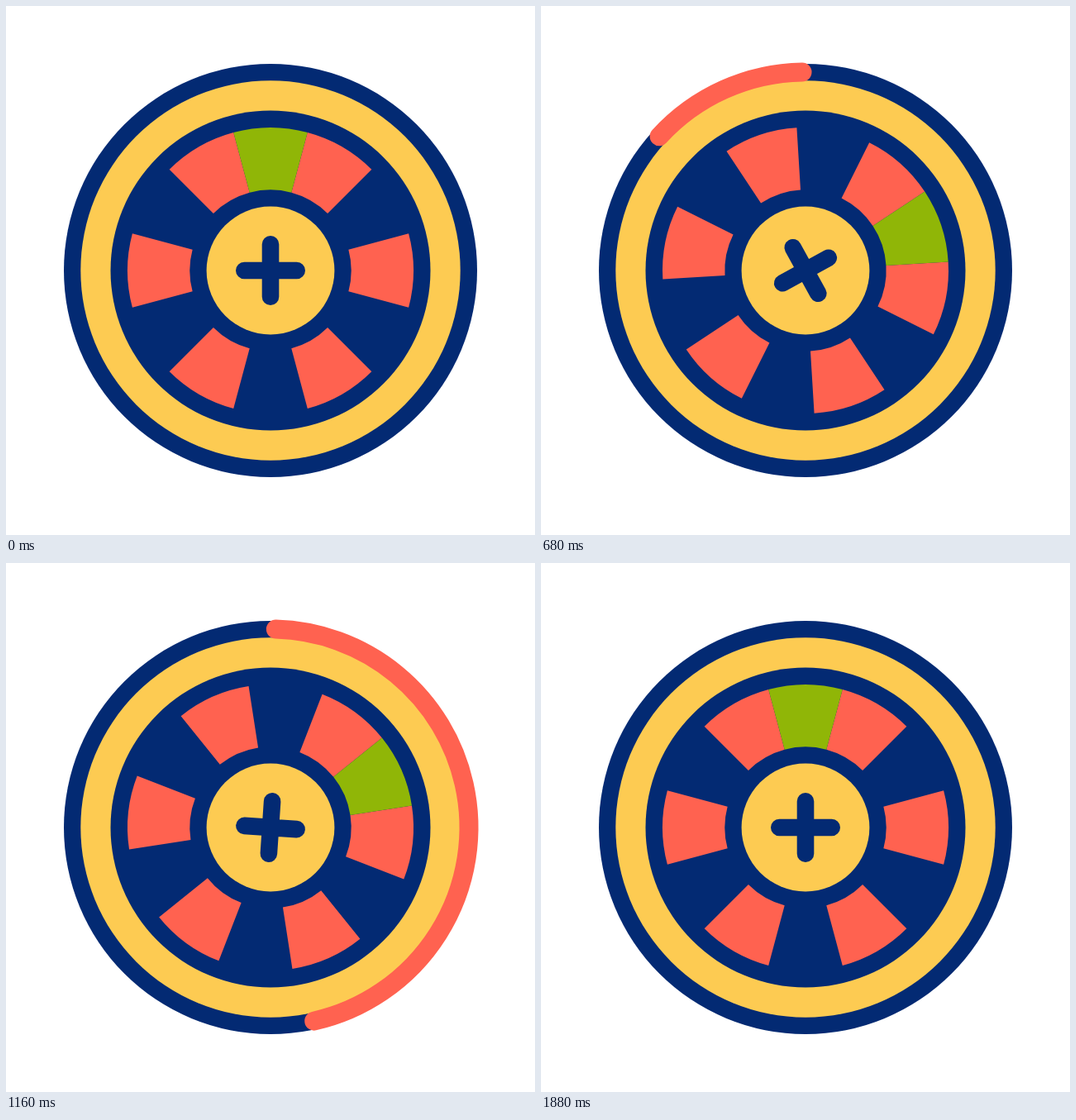
An HTML page with a canvas that plays this animation: 640x640 px, repeating every 2000 ms.

```html
<!DOCTYPE html>
<html>
<head>
<meta charset="utf-8">
<style>
html, body { margin: 0; width: 100%; height: 100%; overflow: hidden; background: #fff; }
canvas { display: block; }
</style>
</head>
<body>
<canvas id="stage" width="640" height="640"></canvas>
<script>
const ctx = document.getElementById('stage').getContext('2d');
const NAVY = '#032a73', YELLOW = '#fdcb52', RED = '#ff6250', GREEN = '#90b607';
const LOOP = 2000, STEP = 40;
const rad = deg => deg * Math.PI / 180;

// Progress from 0 to 1 between two times, eased by cubic-bezier(x1, 0, x2, 1)
function ease(t, from, to, x1, x2) {
  const x = Math.min(1, Math.max(0, (t - from) / (to - from)));
  let lo = 0, hi = 1;
  for (let i = 0; i < 24; i++) {
    const s = (lo + hi) / 2, r = 1 - s;
    if (3 * r * r * s * x1 + 3 * r * s * s * x2 + s * s * s < x) lo = s;
    else hi = s;
  }
  return x === 0 || x === 1 ? x : lo * lo * (3 - 2 * lo);
}

function disc(radius, color) {
  ctx.beginPath();
  ctx.arc(0, 0, radius, 0, 2 * Math.PI);
  ctx.fillStyle = color;
  ctx.fill();
}

// Ring segment 30 degrees wide, angle measured clockwise from the top
function segment(angle, color) {
  const a = rad(angle - 105), b = rad(angle - 75);
  ctx.beginPath();
  ctx.arc(0, 0, 173, a, b);
  ctx.arc(0, 0, 97.7, b, a, true);
  ctx.fillStyle = color;
  ctx.fill();
}

function wheel(angle) {
  for (let k = 0; k < 6; k++) segment(angle - 30 + 60 * k, RED);
  segment(angle, GREEN);
}

function plus(angle) {
  ctx.save();
  ctx.rotate(rad(angle));
  ctx.beginPath();
  ctx.moveTo(-31.7, 0);
  ctx.lineTo(31.7, 0);
  ctx.moveTo(0, -31.7);
  ctx.lineTo(0, 31.7);
  ctx.lineWidth = 20.6;
  ctx.strokeStyle = NAVY;
  ctx.stroke();
  ctx.restore();
}

// Trail running counterclockwise around the rim
function trail(t) {
  const head = 360 * ease(t, 330, 1200, 0.771, 0.664);
  const tail = 360 * ease(t, 680, 1600, 1 / 3, 2 / 3);
  if (head - tail < 0.05) return;
  ctx.beginPath();
  ctx.arc(0, 0, 240, rad(-90.95 - tail), rad(-90.95 - head), true);
  ctx.lineWidth = 23;
  ctx.strokeStyle = RED;
  ctx.stroke();
}

function draw(t) {
  ctx.setTransform(1, 0, 0, 1, 0, 0);
  ctx.fillStyle = '#fff';
  ctx.fillRect(0, 0, 640, 640);
  ctx.translate(320, 320);
  ctx.lineCap = 'round';

  const turn = ease(t, 80, 900, 1 / 3, 0.72) - ease(t, 900, 1880, 0.17, 0.67);
  const spin = ease(t, 90, 900, 0.602, 0.876) - ease(t, 900, 1880, 0.231, 0.561);

  disc(250, NAVY);
  disc(229.7, YELLOW);
  disc(193.5, NAVY);
  wheel(90 * turn);
  disc(77.4, YELLOW);
  plus(-360 * spin);
  trail(t);
}

const start = performance.now();
function tick() {
  const t = (performance.now() - start) % LOOP;
  draw(Math.floor(t / STEP) * STEP);
  requestAnimationFrame(tick);
}
tick();
</script>
</body>
</html>
```
